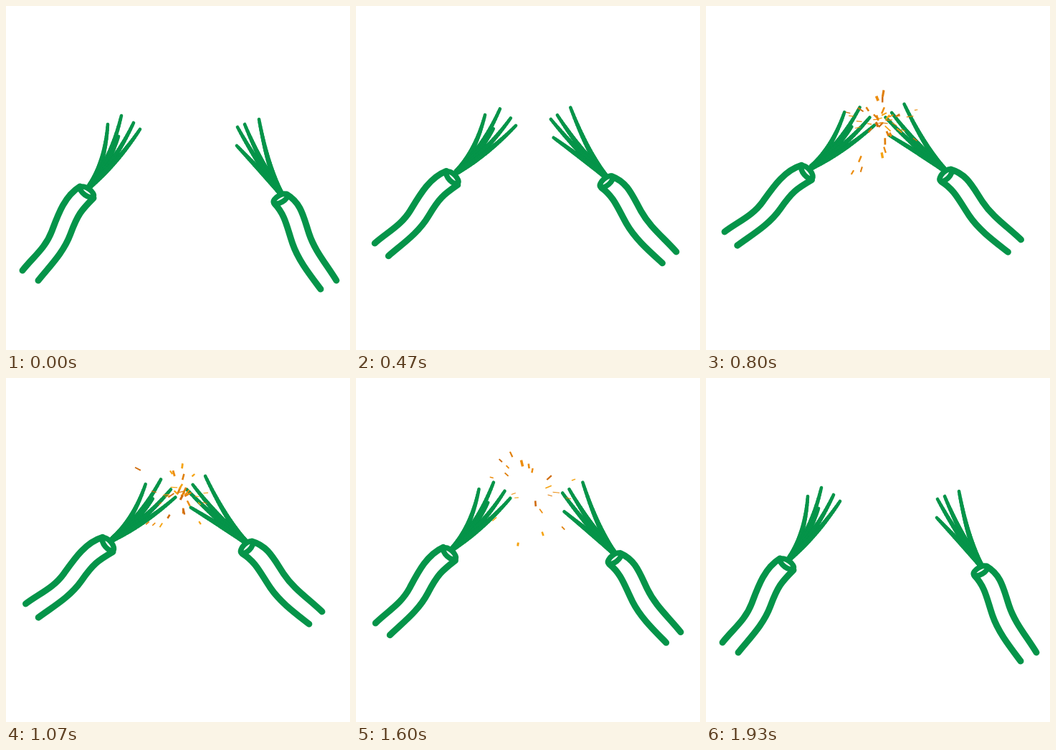
An HTML page with a canvas for the animation above (1.99 s loop, 480 by 480 pixels).

```html
<!DOCTYPE html>
<html>
<head>
<meta charset="utf-8">
<title>Sparking wires</title>
<style>
  html, body { margin: 0; width: 100%; height: 100%; overflow: hidden; background: #fff; }
  canvas { display: block; }
</style>
</head>
<body>
<canvas id="stage" width="480" height="480"></canvas>
<script>
const ctx = document.getElementById('stage').getContext('2d');
const LOOP = 1990, GREEN = '#059449';
const TONES = ['#d06c0c', '#e07f0a', '#ec8c0c', '#f5a312'];
const LIFE = 250, GRAVITY = 0.00015;

// Each wire is drawn in its resting pose and swings around its outer cable end.
const wires = [
  {
    rest: [23, 369], touch: [26, 315], turn: 14.8,
    cables: ['M23 369C38 350 55 338 64 314S82 265 103 252',
             'M45 383C60 364 80 345 90 318S105 285 122 268'],
    collar: [113, 259.5], tilt: 35,
    neck: [118, 250], elbow: [136, 226],
    tips: [[142, 165], [161, 153], [157, 182], [178, 163], [187, 172]]
  },
  {
    rest: [461, 383], touch: [439.5, 326], turn: -15.1,
    cables: ['M461 383C447 360 431 342 423 318S412 275 392 263',
             'M439 395C424 375 408 355 400 332S390 292 375 276'],
    collar: [383, 269], tilt: -30,
    neck: [382, 259], elbow: [372, 232],
    tips: [[353, 158], [333, 165], [340, 181], [323, 169], [322, 195]]
  }
];

let seed = 11;
const random = () => (seed = seed * 16807 % 2147483647) / 2147483647;
const clamp = v => Math.max(0, Math.min(1, v));
const mix = (a, b, k) => a + (b - a) * k;
const radians = degrees => degrees * Math.PI / 180;
const ease = (t, from, to) => {
  const u = clamp((t - from) / (to - from));
  return u * u * (3 - 2 * u);
};

// Sparks stream out of the contact point; steep ones look thicker.
const sparks = Array.from({ length: 150 }, () => {
  const angle = random() * 2 * Math.PI;
  const speed = mix(0.09, 0.33, random());
  const steep = Math.sin(angle) ** 2;
  return {
    start: mix(570, 1500, random()),
    x: mix(236, 250, random()), y: mix(154, 170, random()),
    vx: speed * Math.cos(angle), vy: speed * Math.sin(angle),
    length: mix(6, 12, random()),
    width: 1.3 + 3.2 * steep * mix(0.5, 1, random()),
    tone: TONES[Math.floor(random() * TONES.length)]
  };
});

function drawStrand({ neck, elbow }, tip) {
  const steps = 24;
  const bend = [mix(elbow[0], tip[0], 0.4), mix(elbow[1], tip[1], 0.15)];
  const at = u => [0, 1].map(i =>
    mix(mix(neck[i], bend[i], u), mix(bend[i], tip[i], u), u));
  for (let i = 0; i < steps; i++) {
    ctx.lineWidth = mix(9, 4.4, i / steps);
    ctx.beginPath();
    ctx.moveTo(...at(i / steps));
    ctx.lineTo(...at((i + 1) / steps));
    ctx.stroke();
  }
}

function drawWire(wire, t, closeness) {
  const drift = closeness * (5 * (1 - closeness) + 3 * ease(t, 800, 1333));
  const [x, y] = wire.rest;
  ctx.save();
  ctx.translate(mix(x, wire.touch[0], closeness) + drift, mix(y, wire.touch[1], closeness));
  ctx.rotate(radians(wire.turn * closeness));
  ctx.translate(-x, -y);
  ctx.strokeStyle = GREEN;
  ctx.lineCap = 'round';
  ctx.lineWidth = 9;
  wire.cables.forEach(d => ctx.stroke(new Path2D(d)));
  wire.tips.forEach(tip => drawStrand(wire, tip));
  ctx.lineWidth = 7.5;
  ctx.beginPath();
  ctx.ellipse(...wire.collar, 11, 5, radians(wire.tilt), 0, 2 * Math.PI);
  ctx.stroke();
  ctx.restore();
}

function drawSpark(spark, t) {
  const age = t - spark.start;
  if (age <= 0 || age >= LIFE) return;
  const { vx, vy, length, width } = spark;
  const shrink = 1 - 0.3 * age / LIFE;
  ctx.save();
  ctx.translate(spark.x + vx * age, spark.y + vy * age + GRAVITY * age * age);
  ctx.rotate(Math.atan2(vy + 2 * GRAVITY * age, vx));
  ctx.scale(shrink, shrink);
  ctx.fillStyle = spark.tone;
  ctx.fillRect(-length / 2, -width / 2, length, width);
  ctx.restore();
}

// Fifteen poses a second, each held for 70, 60 or 70 ms.
function poseTime(ms) {
  const part = ms % 200;
  const step = part >= 130 ? 2 : part >= 70 ? 1 : 0;
  return (Math.floor(ms / 200) * 3 + step) * 200 / 3;
}

const begin = performance.now();
function draw() {
  const t = poseTime((performance.now() - begin) % LOOP);
  const closeness = ease(t, 0, 730) - ease(t, 1285, 1915);
  ctx.clearRect(0, 0, 480, 480);
  wires.forEach(wire => drawWire(wire, t, closeness));
  sparks.forEach(spark => drawSpark(spark, t));
  requestAnimationFrame(draw);
}
draw();
</script>
</body>
</html>
```
